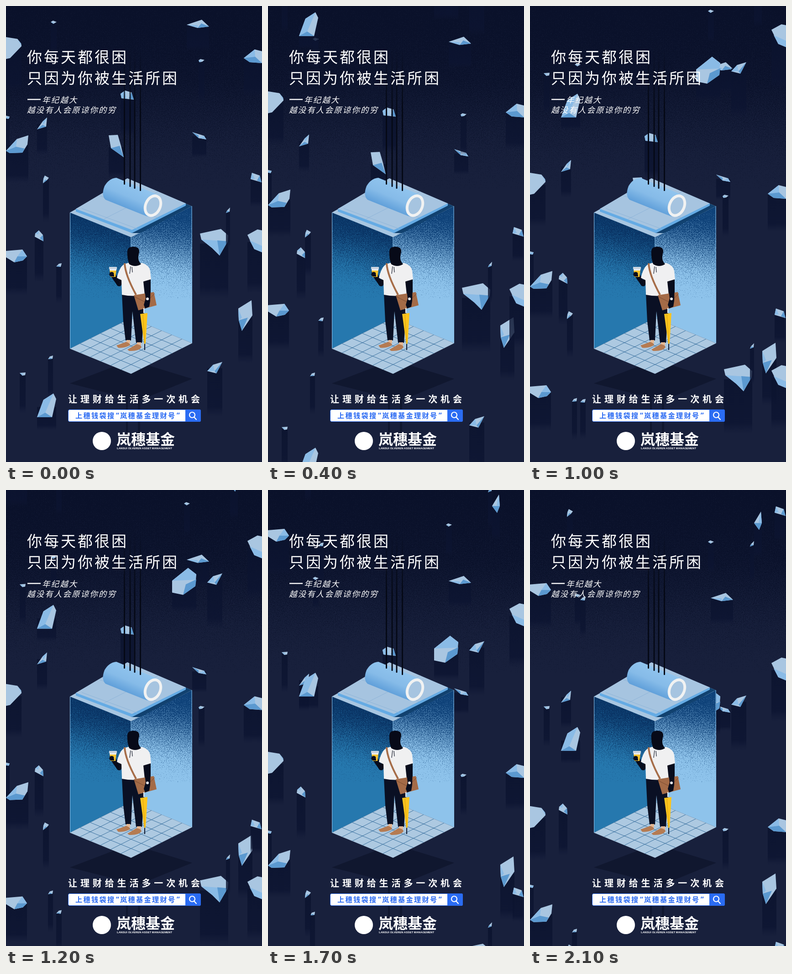
Write an HTML page that moves like this. It is 561 px wide and 998 px high and loops after 2.2 s.

```html
<!DOCTYPE html>
<html lang="zh-CN">
<head>
<meta charset="utf-8">
<title>电梯</title>
<style>
html, body { margin: 0; width: 100%; height: 100%; overflow: hidden; background: #18203c; }
svg { display: block; width: 561px; height: 998px; }
text { font-family: "Noto Sans CJK SC", "Noto Sans CJK", sans-serif; fill: #fff; }
.title { font-size: 33px; font-weight: 300; letter-spacing: 4px; }
.sub { font-size: 17.5px; font-weight: 300; font-style: italic; letter-spacing: 2.1px; }
.slogan { font-size: 20px; font-weight: 700; letter-spacing: 6.9px; }
.search { font-size: 15.2px; font-weight: 700; letter-spacing: 2.3px; fill: #2a6af2; }
.brand { font-size: 32px; font-weight: 700; }
.latin { font: bold 6.1px "Liberation Sans", sans-serif; }
</style>
</head>
<body>
<svg viewBox="0 0 561 998">
  <defs id="defs">
    <linearGradient id="night" x2="0" y2="1">
      <stop offset="0" stop-color="#fff" stop-opacity=".95"/>
      <stop offset=".4" stop-color="#fff" stop-opacity=".7"/>
      <stop offset="1" stop-color="#fff" stop-opacity="0"/>
    </linearGradient>
    <linearGradient id="leftShade" gradientUnits="userSpaceOnUse" x1="225" y1="470" x2="190" y2="625">
      <stop offset="0" stop-color="#fff"/>
      <stop offset="1" stop-color="#fff" stop-opacity="0"/>
    </linearGradient>
    <linearGradient id="rightShade" gradientUnits="userSpaceOnUse" x1="372" y1="450" x2="345" y2="622">
      <stop offset="0" stop-color="#fff"/>
      <stop offset="1" stop-color="#fff" stop-opacity="0"/>
    </linearGradient>
    <linearGradient id="fall" x2="0" y2="1">
      <stop offset="0" stop-color="#0b132e" stop-opacity=".85"/>
      <stop offset=".8" stop-color="#0c1431" stop-opacity=".8"/>
      <stop offset="1" stop-color="#0f1735" stop-opacity="0"/>
    </linearGradient>
    <linearGradient id="rope" gradientUnits="userSpaceOnUse" x1="0" y1="90" x2="0" y2="230">
      <stop offset="0" stop-color="#050916" stop-opacity="0"/>
      <stop offset="1" stop-color="#050916"/>
    </linearGradient>
    <linearGradient id="roll" gradientUnits="userSpaceOnUse" x1="285" y1="393" x2="262" y2="446">
      <stop offset="0" stop-color="#90c4ee"/>
      <stop offset=".5" stop-color="#86bbe8"/>
      <stop offset="1" stop-color="#5b9cd8"/>
    </linearGradient>
    <clipPath id="leftClip"><path d="M140 452 274 506V683L140 750Z"/></clipPath>
    <clipPath id="rightClip"><path d="M274 506 408 438V738L274 683Z"/></clipPath>
  </defs>

  <rect width="561" height="998" fill="#18203c"/>
  <rect width="561" height="400" fill="url(#night)" filter="url(#nightGrain)"/>

  <g fill="#10172f">
    <path d="M140 826 274 775 408 816 290 864Z"/>
    <path d="M263 800h4v160h-4zM289 800h5v160h-5z"/>
  </g>

  <g id="shards"></g>

  <!-- lift -->
  <path d="M140 452 274 506V683L140 750Z" fill="#2678ae"/>
  <g clip-path="url(#leftClip)"><rect x="140" y="440" width="134" height="200" fill="url(#leftShade)" filter="url(#leftGrain)"/></g>
  <path d="M274 506 408 438V738L274 683Z" fill="#8ec3eb"/>
  <g clip-path="url(#rightClip)"><rect x="274" y="430" width="134" height="210" fill="url(#rightShade)" filter="url(#rightGrain)"/></g>
  <path d="M140.5 452V750M274 506V683M407 438V738" fill="none" stroke="#8cc2ec"/>
  <path d="M140 750 274 683 408 738 274 805Z" fill="#adc9e1"/>
  <path id="tiles" fill="none" stroke="#2c6697" stroke-width=".9"/>

  <!-- roof -->
  <path d="M140 452 268 380 407 438 274 506Z" fill="#a8c6e1"/>
  <path d="M274 497 395 433 407 438 294 497Z" fill="#11416f"/>
  <path d="M153 444 266 381 394 432V437L276 497 153 450Z" fill="#65abe4"/>
  <path d="M153 444 266 377 394 432 276 490Z" fill="#a6c4e0"/>
  <path d="M166 443 289 488M205 415 331 463M215 466 334 406" fill="none" stroke="#8eb4d8" stroke-width="1"/>
  <path d="M242 376 333 413Q343 420 341 432 334 456 316 461L308 460 218 424Q208 415 216 394 226 377 242 376Z" fill="url(#roll)"/>
  <ellipse cx="322" cy="437" rx="16" ry="22.5" transform="rotate(24 322 437)" fill="#a6c4e0" stroke="#f1f2f2" stroke-width="6"/>
  <path d="M259.5 90V391M272.5 90V396M282.5 90V400M294.5 90V405" stroke="none"/>
  <g id="ropes" fill="url(#rope)"></g>

  <!-- passenger -->
  <path d="M254 630 304 631 301 690 298 737 285 737 277 668 274 732 262 732 257 690Z" fill="#0a1024"/>
  <path d="M264 731h8v7h-8zM287 736h9v7h-9z" fill="#e4b894"/>
  <path d="M242 743Q248 741 263 735 272 738 272 742 262 749 246 748ZM266 752Q278 745 286 740 297 742 297 747 290 756 270 755Z" fill="#b57b52"/>
  <path d="M246 592 257 597 253 610Q250 616 244 612L231 593 226 589 228 581 239 582 242 590 248 600Z" fill="#080c1c"/>
  <path d="M226 571h17v5h-17z" fill="#cbd4df"/>
  <path d="M227 576h15l-2 17h-11z" fill="#f6c32c"/>
  <path d="M227 576h15v3h-15z" fill="#f0f1f2"/>
  <path d="M227 584Q232 580 236 584L237 592 229 592Z" fill="#080c1c"/>
  <path d="M300 598 317 596 317 640 313 655 305 660 303 640Z" fill="#080c1c"/>
  <path d="M268 562Q284 571 297 562 314 567 316 580L318 598 301 603 304 632Q280 637 254 632L253 600 243 595Q248 572 259 565Z" fill="#f0f0f1"/>
  <path d="M266 538Q266 527 278 527 292 526 292 537L290 548Q289 558 296 565 283 573 270 565 265 552 266 538Z" fill="#070a18"/>
  <path d="M273 570 271 586M276 571 277 583" stroke="#252a39" stroke-width="1.3"/>
  <path d="M260 563Q261 588 285 632" fill="none" stroke="#a66d49" stroke-width="4"/>
  <path d="M280 633 324 626 330 655 290 666Z" fill="#a46b47"/>
  <path d="M281 636 307 649 326 629" fill="none" stroke="#7a4a30"/>
  <path d="M302 605 317 602 316 645 314 658 305 662 302 654 306 640Z" fill="#080c1c"/>
  <circle cx="310" cy="641" r="3" fill="#eef0f2"/>
  <path d="M302 661V676M304 735V753" stroke="#10172c" stroke-width="2"/>
  <path d="M302 661V672" stroke="#f0f0f1" stroke-width="2"/>
  <path d="M294 674 310 672 306 738 303 740Z" fill="#fcc41e"/>
  <path d="M300 675 304 738" stroke="#dda30d" stroke-width="1"/>

  <!-- lettering -->
  <text class="title" x="46" y="123.5">你每天都很困</text>
  <text class="title" x="46" y="169.5">只因为你被生活所困</text>
  <path d="M47 204.5H76" stroke="#fff" stroke-width="2.4"/>
  <text class="sub" x="79" y="211.5">年纪越大</text>
  <text class="sub" x="46" y="234">越没有人会原谅你的穷</text>
  <text class="slogan" x="136" y="868">让理财给生活多一次机会</text>
  <rect x="136.5" y="883.5" width="290" height="26" rx="3" fill="#fff" stroke="#2a6cf3"/>
  <path d="M393 883H424Q427 883 427 886V907Q427 910 424 910H393Z" fill="#2a6cf3"/>
  <g fill="none" stroke="#fff" stroke-width="2.2"><circle cx="408" cy="895" r="6"/><path d="M412 899.5 417 905" stroke-linecap="round"/></g>
  <g>
    <text class="search" x="152" y="902">上穗钱袋搜</text>
    <text class="search" x="241" y="902" style="font-family:'Noto Sans',sans-serif">“</text>
    <text class="search" x="250" y="902">岚穗基金理财号</text>
    <text class="search" x="374" y="902" style="font-family:'Noto Sans',sans-serif">”</text>
  </g>
  <circle cx="210" cy="952" r="20" fill="#fff"/>
  <text class="brand" x="242" y="959.5">岚穗基金</text>
  <text class="latin" x="243" y="969.5">LANSUI OLVEREN ASSET MANAGEMENT</text>
</svg>
<script>
const LOOP = 2200, STEP = 100;
const FAST = 29.7, SLOW = 9.3, WRAP = 953;
const LIGHT = '#a9c6e1', MID = '#8abbe6', DARK = '#5b99d0';
const byId = id => document.getElementById(id);

function add(parent, tag, attrs) {
  const el = document.createElementNS('http://www.w3.org/2000/svg', tag);
  for (const key in attrs) el.setAttribute(key, attrs[key]);
  return parent.appendChild(el);
}

// Turns a soft alpha gradient into speckles of one colour.
function grain(id, color) {
  const f = add(byId('defs'), 'filter', { id, x: 0, y: 0, width: 1, height: 1, 'color-interpolation-filters': 'sRGB' });
  add(f, 'feTurbulence', { type: 'fractalNoise', baseFrequency: .8, numOctaves: 2, seed: 4 });
  add(f, 'feColorMatrix', { values: '0 0 0 0 0 0 0 0 0 0 0 0 0 0 0 1.6 0 0 0 -.3', result: 'noise' });
  add(f, 'feComposite', { in: 'SourceGraphic', in2: 'noise', operator: 'arithmetic', k2: 1, k3: 1, k4: -.5 });
  const transfer = add(f, 'feComponentTransfer', { result: 'specks' });
  add(transfer, 'feFuncA', { type: 'linear', slope: 2, intercept: -.5 });
  add(f, 'feFlood', { 'flood-color': color });
  add(f, 'feComposite', { in2: 'specks', operator: 'in' });
}
grain('nightGrain', '#0a112a');
grain('leftGrain', '#0a3566');
grain('rightGrain', '#0f4279');

[[259.5, 391], [272, 396], [282, 400], [294.5, 405]].forEach(([x, end]) =>
  add(byId('ropes'), 'rect', { x: x - 1.5, y: 90, width: 3, height: end - 90, rx: 1.5 }));

const TILES = 6;
let grid = '';
for (let i = 1; i < TILES; i++) {
  const k = i / TILES, dx = 134 * k;
  grid += `M${140 + dx} ${750 - 67 * k}l134 55M${140 + dx} ${750 + 55 * k}l134 -67`;
}
byId('tiles').setAttribute('d', grid);

const shards = [];
// depth is the distance from the shard's top to the end of its shadow.
function shard(speed, x, y, w, h, depth, outline, mid, dark, limit = 1100) {
  const g = add(byId('shards'), 'g', {});
  add(g, 'rect', { x: 0, y: h * .55, width: w, height: depth - h * .55, fill: 'url(#fall)' });
  add(g, 'polygon', { points: outline, fill: LIGHT });
  if (mid) add(g, 'polygon', { points: mid, fill: MID });
  if (dark) add(g, 'polygon', { points: dark, fill: DARK });
  shards.push({ g, speed, x, y, limit });
}
function wrapped(x, y, ...shape) {
  shard(FAST, x, y, ...shape);
  shard(FAST, x, y - WRAP, ...shape);
}

shard(SLOW, 63, 491, 19, 24, 114, '1,7 9,0 18,10 19,24 0,14', '1,7 9,0 8,9', '11,17 18,10 19,24');
shard(SLOW, 251, 185, 29, 20, 100, '0,7 10,0 24,4 29,20 2,17', '0,7 10,0 13,18 2,17', '18,17 24,4 29,20');
shard(SLOW, 225, 282, 33, 49, 95, '0,1 20,0 27,24 33,49 5,29', '', '5,29 24,24 33,49');
shard(SLOW, 408, 276, 31, 17, 56, '0,0 26,8 31,16 14,13', '14,13 26,8 31,16', '0,0 14,7 14,13');
shard(SLOW, 396, 30, 49, 19, 68, '0,11 33,0 49,15 24,18', '0,11 24,12 24,18', '24,18 32,8 49,15');
shard(SLOW, 68, 244, 22, 26, 82, '22,0 20,20 0,26 12,9', '22,0 12,9 14,17', '0,26 12,16 20,20');
shard(SLOW, 92, 765, 11, 9, 92, '0,8 4,2 11,0 10,7', '', '0,8 5,5 10,7');
shard(SLOW, 509, 644, 31, 67, 138, '0,18 29,0 31,33 8,67 1,44', '0,18 8,38 1,44', '1,44 21,38 8,67');
shard(SLOW, 491, -148, 17, 40, 100, '0,25 15,0 17,25 11,40', '15,0 17,25 10,24', '0,25 17,25 11,40');
shard(SLOW, 98, 32, 13, 7, 70, '0,3 5,0 13,3 6,7', '0,3 6,4 6,7');
shard(SLOW, 390, -85, 13, 7, 70, '0,3 5,0 13,3 6,7', '0,3 6,4 6,7');

shard(FAST, 0, 68, 34, 48, 118, '0,0 25,4 33,14 34,20 9,46 0,48', '25,4 33,14 34,20');
shard(FAST, 521, 95, 40, 31, 102, '0,19 24,0 40,4 40,30 13,28', '0,19 24,0 25,16', '0,19 25,16 40,30 13,28');
shard(FAST, 422, 116, 13, 7, 92, '0,3 4,0 13,2 8,6 2,7', '0,3 8,3 2,7');
shard(FAST, 0, 240, 8, 7, 82, '0,0 8,2 6,7 0,6', '0,3 8,2 6,7 0,6');
shard(FAST, 0, 283, 49, 39, 104, '0,34 24,8 49,0 47,20 36,38 8,39', '0,34 24,8 22,25', '0,34 22,25 41,29 36,38 8,39');
shard(FAST, 425, 488, 62, 58, 152, '0,10 46,0 62,14 61,27 43,58 27,42 3,23', '3,23 60,27 43,58 27,42', '38,25 61,27 43,58');
shard(FAST, 529, 489, 32, 50, 140, '0,12 22,0 32,2 32,50 15,43', '5,24 32,36 32,50 15,43', '', 860);
shard(FAST, 529, -257, 32, 50, 140, '0,12 22,0 32,2 32,50 15,43', '5,24 32,36 32,50 15,43');
shard(FAST, 364, -186, 53, 59, 97, '0,28 35,0 53,14 51,40 24,59 0,54', '0,28 35,0 53,14 51,26', '24,59 30,36 53,25 51,40');
wrapped(81, 371, 13, 17, 102, '4,0 13,5 9,10 0,17 1,7', '4,0 1,7 0,17', '0,17 5,9 9,10');
wrapped(536, 365, 23, 22, 75, '3,0 20,6 24,21 0,14', '3,0 9,13 0,14', '14,17 20,6 24,21');
wrapped(482, 441, 9, 12, 90, '9,0 8,9 0,12 2,7', '', '0,12 3,7 8,9');
wrapped(441, 779, 33, 25, 120, '0,20 13,6 33,0 20,25', '0,20 13,6 16,20', '16,20 33,0 20,25');
wrapped(30, 802, 13, 7, 89, '0,1 13,0 12,6 6,7', '0,1 7,3 6,7');
wrapped(68, 848, 42, 54, 80, '0,52 14,14 36,0 42,12 33,52', '0,52 14,14 36,0 18,42', '0,52 18,42 33,52');
wrapped(0, 533, 46, 28, 100, '0,3 36,0 46,15 37,24 18,28 0,17', '36,0 46,15 25,15', '18,28 25,15 46,15 37,24');
wrapped(110, 563, 12, 9, 88, '0,7 6,1 12,0 10,8', '', '0,7 6,5 10,8');

function draw(now) {
  const n = Math.floor((now % LOOP) / STEP);
  for (const { g, speed, x, y, limit } of shards) {
    const top = y + speed * n;
    g.setAttribute('transform', `translate(${x} ${top.toFixed(1)})`);
    g.setAttribute('visibility', top < limit ? 'visible' : 'hidden');
  }
}

const start = performance.now();
function tick() {
  draw(performance.now() - start);
  requestAnimationFrame(tick);
}
tick();
</script>
</body>
</html>
```
